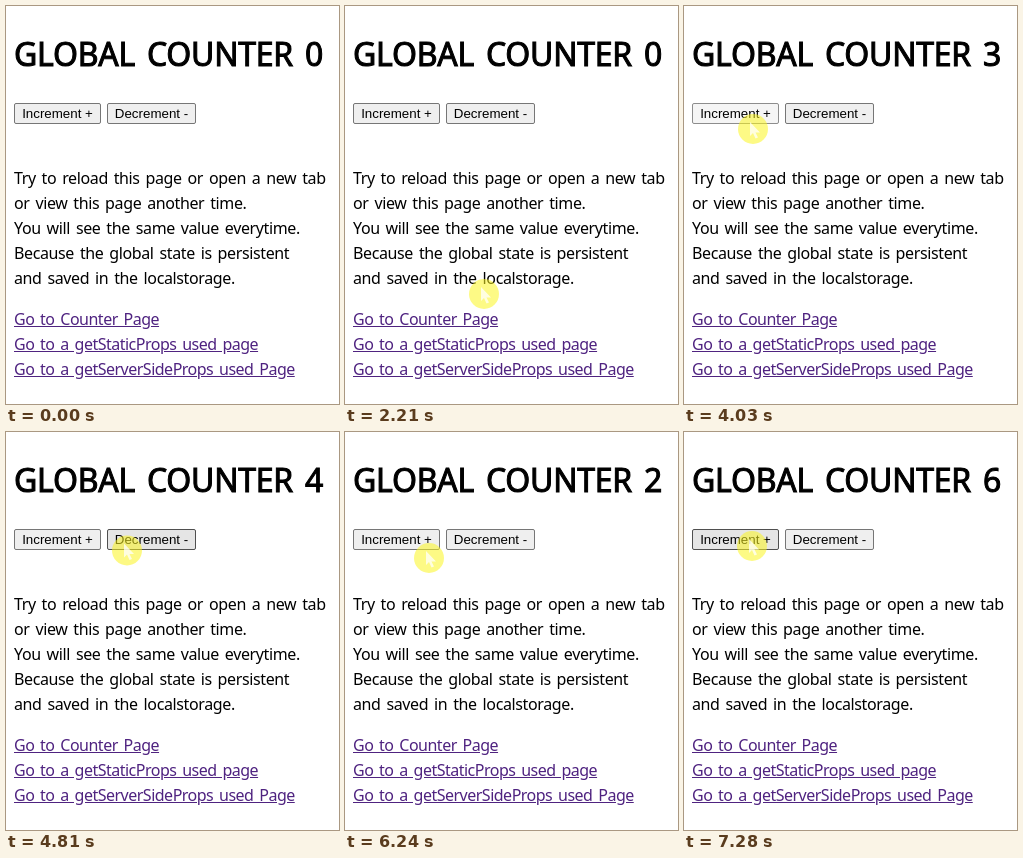
Animation of 333x398 px, one loop 8 s. Source, as an HTML page:

```html
<!DOCTYPE html>
<html lang="en">
<head>
<meta charset="utf-8">
<title>Global counter</title>
<style>
  html, body { margin: 0; width: 100%; height: 100%; overflow: hidden; background: #fff; }
  body { position: relative; font: 16px/25px "Noto Sans", sans-serif; color: #000; word-spacing: 2.1px; }
  h1, p, nav, button, #pointer { position: absolute; margin: 0; white-space: nowrap; }
  h1 {
    left: 8px; top: 28px; font-size: 32px; line-height: 40px; font-weight: 400;
    -webkit-text-stroke: 1px #000; letter-spacing: -.25px; word-spacing: 4px;
  }
  p { left: 8px; top: 160px; letter-spacing: -.38px; }
  nav { left: 8px; top: 301px; letter-spacing: -.5px; }
  a { color: #4f2380; text-decoration: underline; }
  button {
    top: 97px; height: 21px; box-sizing: border-box; padding: 0; word-spacing: 0;
    font: 13.333px/19px "Liberation Sans", Arial, sans-serif; color: #000;
    background: #efefef; border: 1px solid #767676; border-radius: 2px;
  }
  #inc { left: 8px; width: 87px; }
  #dec { left: 101px; width: 89px; }
  button.hover { background: #e5e5e5; border-color: #4f4f4f; }
  button.press { background: #f5f5f5; border-color: #8d8d8d; }
  #pointer { left: -16px; top: -16px; pointer-events: none; }
</style>
</head>
<body>
<h1>GLOBAL COUNTER <span id="count">0</span></h1>
<button id="inc">Increment +</button>
<button id="dec">Decrement -</button>
<p>Try to reload this page or open a new tab<br>
or view this page another time.<br>
You will see the same value everytime.<br>
Because the global state is persistent<br>
and saved in the localstorage.</p>
<nav><a>Go to Counter Page</a><br>
<a>Go to a getStaticProps used page</a><br>
<a>Go to a getServerSideProps used Page</a></nav>
<svg id="pointer" width="32" height="32" viewBox="-16 -16 32 32">
  <circle r="15" fill="#fbf520" fill-opacity=".55"/>
  <path d="M-3-7V7L0 4 2.5 9.5 5 8.5 2.5 3.5H7Z" fill="#fff" fill-opacity=".75"/>
</svg>
<script>
const LOOP = 8000, STEP = 130, GLIDE = 260;

// The pointer glides to each stop, arrives at the given time and rests.
const stops = [
  { at: 1690, x: 170, y: 414 },
  { at: 2210, x: 139, y: 288 },
  { at: 2470, x: 69, y: 123 },
  { at: 4940, x: 173, y: 114 },
  { at: 6240, x: 84, y: 126 },
  { at: 6500, x: 68, y: 114 }
];

// Evenly spaced clicks
const series = (start, gap, n, add) =>
  Array.from({ length: n }, (_, i) => ({ at: start + i * gap, add }));
const clicks = [
  ...series(2600, 520, 4, 1),
  ...series(5720, 260, 2, -1),
  ...series(6500, 208, 4, 1)
];

const $ = id => document.getElementById(id);
const count = $("count"), pointer = $("pointer");
const buttons = [{ el: $("inc"), add: 1 }, { el: $("dec"), add: -1 }];

function position(t) {
  let { x, y } = stops[0];
  for (const s of stops.slice(1)) {
    const u = Math.min(1, Math.max(0, (t - s.at) / GLIDE + 1));
    const k = u * u * (3 - 2 * u);
    x += (s.x - x) * k;
    y += (s.y - y) * k;
  }
  return { x, y };
}

function isOver(el, x, y) {
  const r = el.getBoundingClientRect();
  return x >= r.left && x < r.right && y >= r.top && y < r.bottom;
}

function draw(time) {
  const t = Math.floor(time / STEP) * STEP;
  const { x, y } = position(t);
  count.textContent = clicks.reduce((n, c) => c.at <= t ? n + c.add : n, 0);
  pointer.style.transform = `translate(${x}px, ${y}px)`;
  for (const { el, add } of buttons) {
    const over = isOver(el, x - 3, y - 7);
    const down = over && clicks.some(c => c.add === add && t < c.at && t >= c.at - STEP);
    el.className = down ? "press" : over ? "hover" : "";
  }
}

function tick() {
  draw(performance.now() % LOOP);
  requestAnimationFrame(tick);
}
tick();
</script>
</body>
</html>
```
